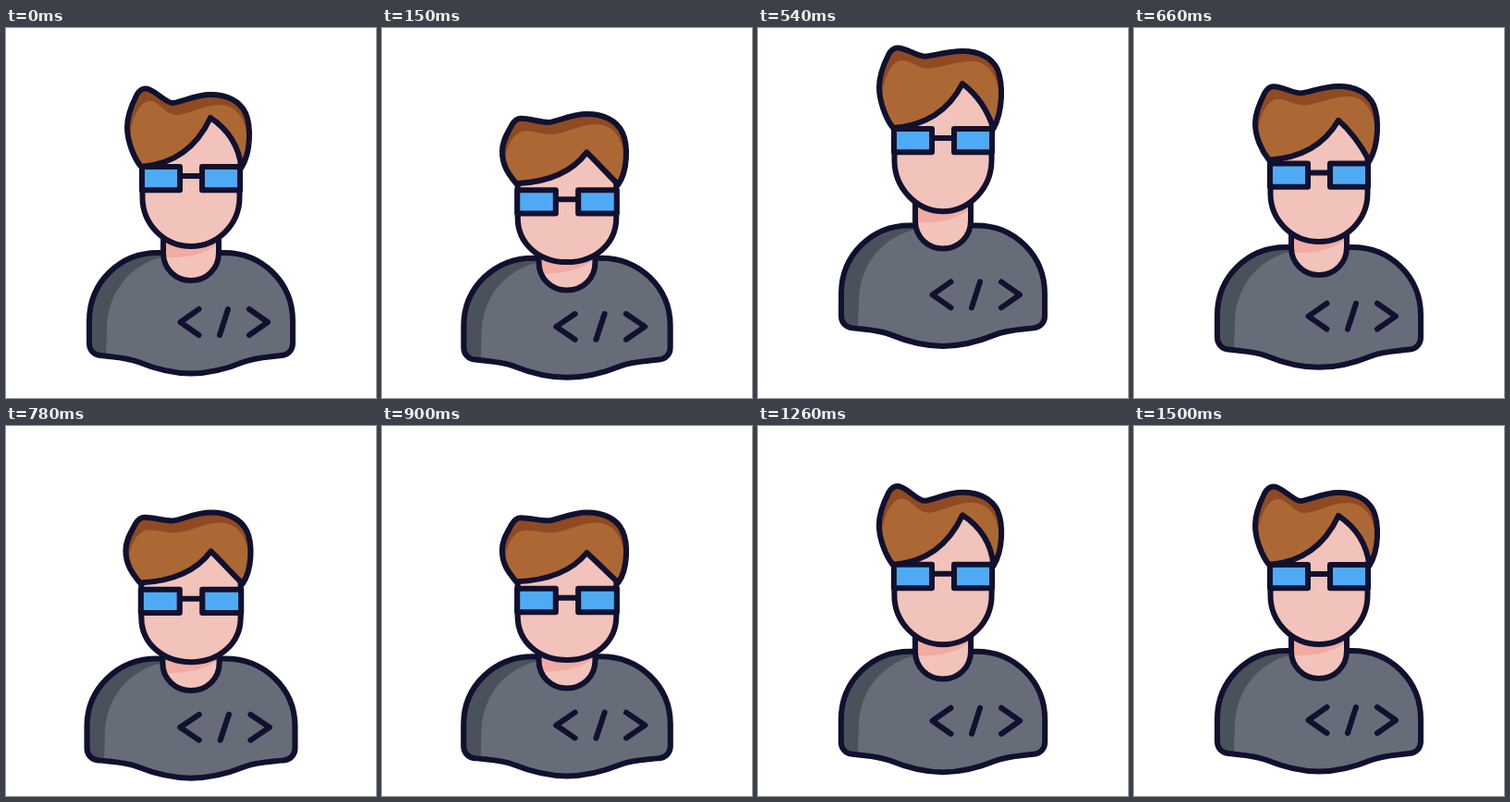
These frames come from a looping animation (400x400 px, 3.53 s). An HTML page:

```html
<!DOCTYPE html>
<html lang="en">
<head>
<meta charset="utf-8">
<title>Coder bounce</title>
<style>
  html, body { margin: 0; width: 100%; height: 100%; overflow: hidden; background: #fff; }
  svg { display: block; width: 100vw; height: 100vh; }
  .line { fill: none; }
  .line, .lens { stroke: #11112f; stroke-width: 6; stroke-linejoin: round; stroke-linecap: round; }
  .lens { fill: #4faaf6; }
</style>
</head>
<body>
<svg viewBox="0 0 400 400">
  <defs>
    <clipPath id="bodyClip"><path data-d="body"/></clipPath>
    <clipPath id="neckClip"><path data-d="neck"/></clipPath>
    <clipPath id="hairClip"><path data-d="hair"/></clipPath>
  </defs>
  <g id="figure">
    <path data-d="body" fill="#666d79"/>
    <path data-d="bodyShade" fill="#4a515b" clip-path="url(#bodyClip)"/>
    <path data-d="body" class="line"/>
    <path data-d="code" class="line"/>
    <path data-d="neck" fill="#f2c3ba"/>
    <path data-d="neckShade" fill="#f0aba2" clip-path="url(#neckClip)"/>
    <path data-d="neck" class="line"/>
    <path data-d="skin" fill="#f2c3ba"/>
    <path data-d="face" class="line"/>
    <path data-d="hair" fill="#8f4a21"/>
    <path data-d="hairLight" fill="#ab6835" clip-path="url(#hairClip)"/>
    <path data-d="hair" class="line"/>
    <g id="glasses">
      <path d="M188 160H212" class="line"/>
      <rect x="147" y="150" width="41" height="25.3" class="lens"/>
      <rect x="212" y="150" width="41" height="25.3" class="lens"/>
    </g>
  </g>
</svg>
<script>
const LOOP = 3530, STEP = 30;

// Every part makes the same bounce; higher parts swing further and later.
const parts = {
  hem:     { lift: 42, dip: 7.5, lag: 0 },
  collar:  { lift: 42, dip: 9,  lag: 2 },
  neck:    { lift: 48, dip: 14, lag: 10 },
  chin:    { lift: 51, dip: 21, lag: 20 },
  glasses: { lift: 54, dip: 30, lag: 30 },
  base:    { lift: 55, dip: 22, lag: 25 },
  peak:    { lift: 48, dip: 44, lag: 42 },
  quiff:   { lift: 57, dip: 38, lag: 36 },
  notch:   { lift: 64, dip: 25, lag: 30 },
  crown:   { lift: 60, dip: 25, lag: 30 }
};

const mix = (a, b, u) => a + (b - a) * u;
const ease = u => (1 - Math.cos(Math.PI * u)) / 2;

// Crouch, leap, land, small rebound, settle
function bounce(t, { lift, dip, lag }) {
  const turns = [
    [0, 0], [110, .85 * dip], [410, -lift], [800, dip],
    [1110, -.08 * lift], [1300, .03 * lift], [1455, 0]
  ];
  const s = t - lag;
  const i = turns.findIndex(([at]) => s < at);
  if (i <= 0) return 0;
  const [t0, y0] = turns[i - 1], [t1, y1] = turns[i];
  return mix(y0, y1, ease((s - t0) / (t1 - t0)));
}

// Points are [x, y]; curves are chains of cubic Béziers.
const shift = dy => (x, y) => [x, y + dy];
const curve = ([first, ...rest]) => `M${first}C${rest.join(" ")}`;
const line = pts => "M" + pts.join("L");
const mirror = half => [...half, ...half.slice(0, -1).reverse().map(([x, y]) => [400 - x, y])];

function shapes(o) {
  const B = (x, y) => [x, y + mix(o.collar, o.hem, (y - 243) / 131)];
  const F = (x, y) => [x, y + mix(o.peak, o.base, (y - 97) / 53)];
  const N = shift(o.neck), C = shift(o.chin), H = shift(o.base);
  const Q = shift(o.quiff), V = shift(o.notch), R = shift(o.crown);
  const cheek = shift(mix(o.glasses, o.chin, .4));
  const left = shift(mix(o.quiff, o.base, .4));
  const right = shift(mix(o.crown, o.base, .4));
  // The fringe straightens as the hair is squeezed
  const bulge = Math.max(0, 1 + (o.base - o.peak) / 16);

  const jaw = curve(mirror([
    cheek(147.5, 183), cheek(147.5, 212), C(171, 236), C(200, 236)
  ]));
  const face = jaw + "L" + H(252.5, 149) + line([H(147.5, 149), cheek(147.5, 183)]);

  return {
    body: curve(mirror([
      B(164, 243), B(123, 243), B(90, 275), B(90, 317),
      B(90, 325), B(90, 333), B(90, 341), B(90, 348), B(95, 353.5), B(102, 354),
      B(118, 356), B(130, 356), B(143, 361), B(160, 368), B(178, 373.5), B(200, 373.5)
    ])) + "Z",
    bodyShade: curve([B(172, 247), B(145, 252), B(112, 275), B(109, 322)])
      + "L" + [B(108, 360), B(84, 360), B(84, 236), B(172, 236)].join("L") + "Z",
    code: line([B(208.5, 304), B(188.5, 318), B(208.5, 332)])
      + line([B(240, 304), B(231, 332)])
      + line([B(263, 304), B(283, 318), B(263, 332)]),
    neck: "M" + C(170, 222) + curve(mirror([
      N(170, 243), N(170, 260), N(183, 273), N(200, 273)
    ])).replace("M", "L") + "L" + C(230, 222),
    neckShade: curve([C(168, 248), C(190, 249), C(214, 247), C(232, 231)])
      + "L" + [C(232, 220), C(168, 220)].join("L") + "Z",
    face,
    skin: jaw + "L" + [F(252.5, 127), F(221, 97), H(147.5, 148)].join("L") + "Z",
    hair: curve([
      H(146, 150), H(138, 140), left(131, 122), left(131, 107),
      left(131, 95), Q(137, 81), Q(141, 73), Q(144, 67.5), Q(147, 65.5), Q(151, 65.5),
      Q(160, 65.5), V(172, 81), V(180, 81), V(188, 81), R(204, 72), R(221, 72),
      R(239, 72), R(253, 79), R(259, 92), right(265, 106), right(265, 134), H(254.5, 151),
      F(242 + 10 * bulge, 132 - 2 * bulge), F(232 + 10 * bulge, 114 - 3 * bulge), F(221, 97),
      F(208, 125), F(186, 147), H(146, 150)
    ]) + "Z",
    hairLight: curve([
      left(134, 122), left(134, 102), Q(143, 79), Q(156, 79),
      Q(165, 79), V(173, 94), V(184, 94), V(196, 94), R(214, 83), R(230, 83),
      R(248, 83), R(257, 95), right(261, 116)
    ]) + "L" + [H(262, 158), H(140, 158)].join("L") + "Z"
  };
}

const figure = document.getElementById("figure");
const glasses = document.getElementById("glasses");
const paths = document.querySelectorAll("[data-d]");

function draw(t) {
  const o = {};
  for (const name in parts) o[name] = bounce(t, parts[name]);
  const d = shapes(o);
  for (const el of paths) el.setAttribute("d", d[el.dataset.d]);
  const wide = 1 + .0026 * Math.max(0, o.collar);
  glasses.setAttribute("transform", `translate(0 ${o.glasses})`);
  figure.setAttribute("transform", `translate(${200 * (1 - wide)} 0) scale(${wide} 1)`);
}

const start = performance.now();
function tick() {
  const t = (performance.now() - start) % LOOP;
  draw(Math.floor(t / STEP) * STEP);
  requestAnimationFrame(tick);
}
tick();
</script>
</body>
</html>
```
